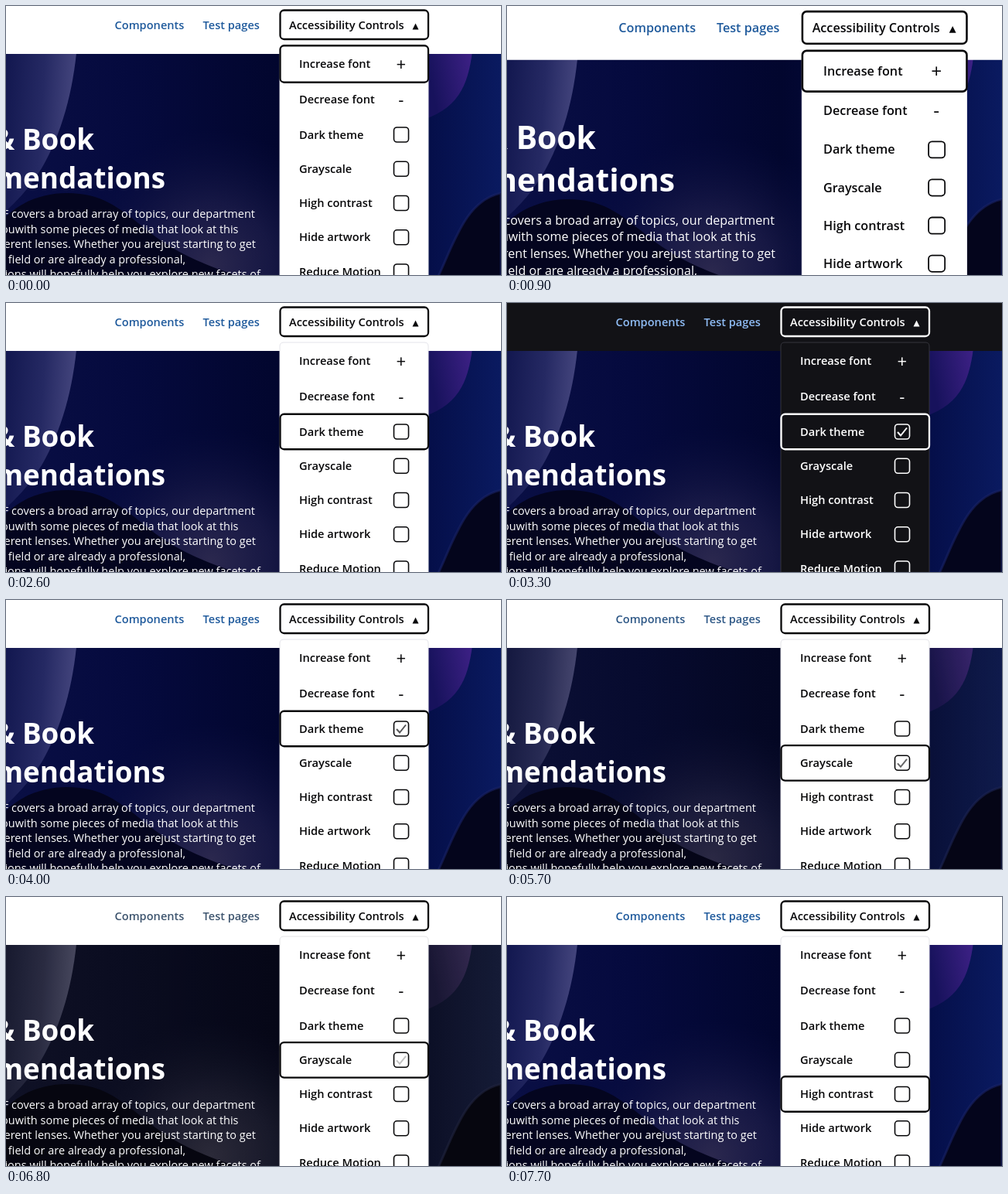
These frames come from a looping animation (640x348 px, 8 s). An HTML page:

```html
<!DOCTYPE html>
<html lang="en">
<head>
<meta charset="utf-8">
<title>Accessibility controls</title>
<style>
  html, body { margin: 0; width: 100%; height: 100%; overflow: hidden; background: #fff; }
  svg {
    display: block; width: 100vw; height: 100vh;
    font: 600 14.6px "Open Sans", sans-serif;
    --page: #fff; --ink: #08080a; --link: #1f5a9c; --edge: #e4e4ea;
  }
  svg.dark { --page: #121216; --ink: #fff; --link: #8fbcf5; --edge: #34343c; }
  .page { fill: var(--page); }
  .panel { fill: var(--page); stroke: var(--edge); }
  .ink { fill: var(--ink); }
  .link { fill: var(--link); }
  .frame { fill: none; stroke: var(--ink); stroke-width: 2.3; }
  .box { fill: none; stroke: var(--ink); stroke-width: 1.6; }
  .sign { font-size: 22px; font-weight: 500; text-anchor: middle; }
  .copy { fill: #fff; font-size: 14.5px; font-weight: 500; text-anchor: end; }
  .title { fill: #fff; font-weight: 700; font-size: 36.8px; text-anchor: end; }
</style>
</head>
<body>
<svg id="stage" viewBox="0 0 640 348" preserveAspectRatio="none">
  <defs>
    <linearGradient id="sky">
      <stop offset="0" stop-color="#0a0f45"/>
      <stop offset=".25" stop-color="#050a3e"/>
      <stop offset=".55" stop-color="#02062e"/>
      <stop offset=".86" stop-color="#050f4a"/>
      <stop offset="1" stop-color="#0a1a60"/>
    </linearGradient>
    <radialGradient id="glow" gradientUnits="userSpaceOnUse" cx="265" cy="335" r="175">
      <stop offset="0" stop-color="#2b284e"/>
      <stop offset=".45" stop-color="#1d1d4a" stop-opacity=".75"/>
      <stop offset="1" stop-color="#0b0f40" stop-opacity="0"/>
    </radialGradient>
    <linearGradient id="petal" x2="1" y2=".15">
      <stop offset="0" stop-color="#12174f"/>
      <stop offset=".55" stop-color="#252963"/>
      <stop offset="1" stop-color="#45467e"/>
    </linearGradient>
    <linearGradient id="violet" x2="1" y2="-.3">
      <stop offset="0" stop-color="#17125c"/>
      <stop offset="1" stop-color="#43238c"/>
    </linearGradient>
  </defs>

  <g id="backdrop">
    <path d="M0 50H640V360H0z" fill="url(#sky)"/>
    <path d="M0 50H640V360H0z" fill="url(#glow)"/>
    <path d="M0 50H92C87 110 72 165 46 210Q28 240 0 265z" fill="url(#petal)"/>
    <path d="M0 272C26 248 60 239 95 243S150 264 185 292S260 338 335 360H0z" fill="#04051f"/>
    <path d="M540 50H604C599 95 590 130 540 147z" fill="url(#violet)"/>
    <path d="M640 242C592 252 578 312 554 360H640z" fill="#04051c" stroke="#1a2468" stroke-width="3" stroke-opacity=".6"/>
  </g>
  <g id="copy"></g>
  <g id="chrome">
    <path class="page" d="M-20-20H680V62H-20z"/>
    <text class="link" x="140.500" y="29.500">Components</text>
    <text class="link" x="254.500" y="29.500">Test pages</text>
    <path class="panel" d="M354 400V56q0-5 5-5H541q5 0 5 5V400z"/>
    <rect class="frame" x="354.500" y="5.500" width="191.500" height="37.500" rx="5"/>
    <text class="ink" x="366" y="29.500">Accessibility Controls</text>
    <path class="ink" d="M525.500 30.500h8l-4-8z"/>
    <g id="menu"></g>
    <rect id="focus" class="frame" x="354.500" width="191.500" rx="5"/>
  </g>
</svg>
<script>
const LOOP = 8000, TICK = 100;
const byId = id => document.getElementById(id);

function add(parent, tag, attrs, text = '') {
  const node = document.createElementNS('http://www.w3.org/2000/svg', tag);
  for (const name in attrs) node.setAttribute(name, attrs[name]);
  node.textContent = text;
  return parent.appendChild(node);
}

// Hero copy, right-aligned so that its start runs off the stage
[['Book Clubs & Book', 114], ['Recommendations', 206]].forEach(([text, x], i) =>
  add(byId('copy'), 'text', { class: 'title', x, y: 186 + 49.5 * i }, text));
[
  ['F covers a broad array of topics, our department', 322],
  ['youwith some pieces of media that look at this', 300.5],
  ['different lenses. Whether you arejust starting to get', 323],
  ['the field or are already a professional,', 232],
  ['Recommendations will hopefully help you explore new facets of', 329]
].forEach(([text, x], i) =>
  add(byId('copy'), 'text', { class: 'copy', x, y: 274 + 19.6 * i }, text));

// Menu rows: label, centre and sign (rows without a sign get a checkbox)
const rows = [
  ['Increase font', 75, '+'], ['Decrease font', 121, '-'], ['Dark theme', 166.5],
  ['Grayscale', 210.8], ['High contrast', 255], ['Hide artwork', 299.3], ['Reduce Motion', 343.5]
].map(([label, y, sign]) => {
  const menu = byId('menu');
  add(menu, 'text', { class: 'ink', x: 379, y: y + 5 }, label);
  if (sign) {
    add(menu, 'text', { class: 'ink sign', x: 510.7, y: y + 8 }, sign);
    return { y, height: 47.5 };
  }
  add(menu, 'rect', { class: 'box', x: 501.5, y: y - 9.5, width: 19, height: 19, rx: 4 });
  const tick = add(menu, 'path', { class: 'box', d: `M505 ${y + .5}l4 4.500 8-10`, opacity: 0 });
  tick.style.strokeWidth = 2;
  return { y, height: 45.5, tick };
});

// Timelines of [start, value]
const focusSteps = [[0, 0], [1300, 1], [2500, 2], [5300, 3], [7400, 4]];
const fontSteps = [[0, 0], [100, 1], [500, 2], [1600, 1], [2100, 0]];
const valueAt = (steps, t) => steps.filter(([start]) => start <= t).pop()[1];

const clamp = v => Math.min(1, Math.max(0, v));
const linear = p => p;

// The CSS "ease" curve
function ease(p) {
  let lo = 0, hi = 1;
  for (let i = 0; i < 20; i++) {
    const u = (lo + hi) / 2;
    if (.75 * u * (1 - u) + u ** 3 < p) lo = u; else hi = u;
  }
  return .3 * lo * (1 - lo) ** 2 + 3 * lo * lo * (1 - lo) + lo ** 3;
}

// Level that fades in from "on" and out from "off"
const fade = (t, on, off, duration, curve) =>
  curve(clamp((t - on) / duration)) - curve(clamp((t - off) / duration));

function draw(t) {
  const level = valueAt(fontSteps, t), scale = 1 + .055 * level;
  const zoom = (id, dy) => byId(id).setAttribute('transform',
    `translate(${-5.8 * level} ${dy * level}) scale(${scale})`);
  zoom('copy', -10.8);
  zoom('chrome', .5);
  byId('backdrop').setAttribute('transform', `translate(0 ${4 * level})`);

  const { y, height } = rows[valueAt(focusSteps, t)];
  byId('focus').setAttribute('y', y - height / 2);
  byId('focus').setAttribute('height', height);

  rows[2].tick.setAttribute('opacity', fade(t, 2700, 3950, 160, linear));
  rows[3].tick.setAttribute('opacity', fade(t, 5600, 6680, 160, linear));
  byId('stage').classList.toggle('dark', t >= 2800 && t < 4000);
  const gray = fade(t, 5600, 6680, 500, ease);
  byId('stage').style.filter = gray > 0 ? `grayscale(${gray})` : 'none';
}

const origin = performance.now();
function loop() {
  const t = (performance.now() - origin) % LOOP;
  draw(Math.floor(t / TICK) * TICK);
  requestAnimationFrame(loop);
}
draw(0);
requestAnimationFrame(loop);
</script>
</body>
</html>
```
